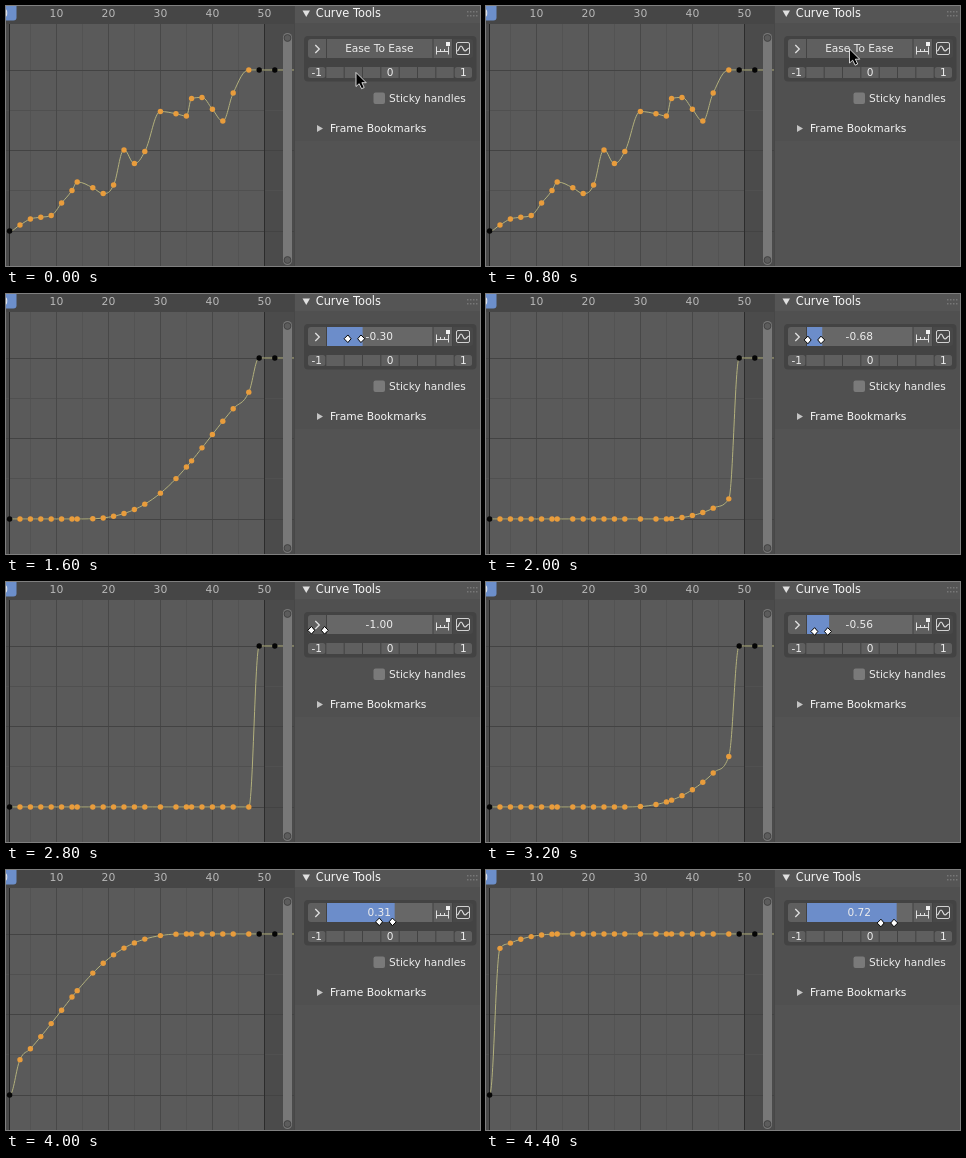
These frames come from a looping animation (474x260 px, 4500 ms). An HTML page:

```html
<!DOCTYPE html>
<html lang="en">
<head>
<meta charset="utf-8">
<title>Ease to ease slider</title>
<style>
html, body { margin: 0; width: 100%; height: 100%; overflow: hidden; background: #535353; }
svg { display: block; width: 474px; height: 260px; }
text { font-family: "DejaVu Sans", sans-serif; font-size: 10.6px; fill: #ececec; }
.mid { text-anchor: middle; }
.title { fill: #f6f6f6; font-size: 10.7px; }
.ruler text { fill: #b8b8b8; font-size: 10.8px; text-anchor: middle; }
.line { fill: none; stroke: #e0e0e0; }
</style>
</head>
<body>
<svg viewBox="0 0 474 260">
  <rect width="288" height="260" fill="#4b4b4b"/>
  <rect x="3" width="255.5" height="260" fill="#5a5a5a"/>
  <g id="grid" shape-rendering="crispEdges"></g>
  <path id="curve" fill="none" stroke="#b2b07c"/>
  <g id="dots"></g>

  <rect width="288" height="18" fill="#464646"/>
  <g id="ruler" class="ruler"></g>
  <rect x="-14" y="-4" width="24.5" height="18.5" rx="3" fill="#6c8fcb"/>
  <text class="mid" x="-1.5" y="11">0</text>

  <rect x="277" y="27" width="9" height="232" rx="4.5" fill="#787878"/>
  <circle cx="281.5" cy="32" r="3.4" fill="#5c5c5c" stroke="#434343"/>
  <circle cx="281.5" cy="254" r="3.4" fill="#5c5c5c" stroke="#434343"/>

  <rect x="288" width="186" height="260" fill="#535353"/>
  <rect x="288" width="186" height="135" fill="#505050"/>
  <rect x="288" width="186" height="17" fill="#555"/>
  <rect x="288" width="1" height="260" fill="#474747"/>
  <path d="M296.5 4.500h7.500l-3.750 6.500z" fill="#e0e0e0"/>
  <text class="title" x="309.700" y="11.300" style="font-size:11.400px">Curve Tools</text>
  <g id="grip" fill="#777"></g>

  <rect x="298" y="30" width="172.500" height="45.500" rx="4" fill="#434343"/>
  <path d="M305 33h15v19h-15a3 3 0 0 1 -3 -3v-13a3 3 0 0 1 3 -3z" fill="#5f5f5f"/>
  <path class="line" d="M309.300 39l4 4l-4 4" stroke-width="1.300"/>
  <rect id="field" x="321" y="33" width="105.500" height="19"/>
  <rect id="fill" x="321" y="33" height="19" fill="#6c8dca"/>
  <text id="label" class="mid" x="373.300" y="46"></text>

  <rect x="427.500" y="33" width="18.500" height="19" fill="#5f5f5f"/>
  <path class="line" d="M430.500 40.500v8M442.500 40.500v8M430.500 45.500h12M434.500 43v3M438.500 43v3"/>
  <rect x="440" y="36" width="4" height="4" fill="#f0f0f0"/>
  <path d="M447 33h17a3 3 0 0 1 3 3v13a3 3 0 0 1 -3 3h-17z" fill="#484848"/>
  <rect class="line" x="450.500" y="36.500" width="13" height="12" rx="1.500" stroke-width=".9"/>
  <path class="line" d="M451 45c2 0 2.200 -5 4 -5s2.200 5 4 5s2 -3 4.500 -3" stroke-width="1.200"/>

  <g id="blocks"></g>
  <rect x="367.500" y="86.500" width="11.500" height="11.500" rx="2" fill="#7a7a7a"/>
  <text x="383" y="96.300">Sticky handles</text>
  <path d="M311 119l6 3.500l-6 3.500z" fill="#c4c4c4"/>
  <text class="title" x="324" y="126.300">Frame Bookmarks</text>

  <path id="arrow" d="M0 0V14L3.200 11.200L5.600 16.200L8.200 15L5.900 10.200H10.200Z"
    fill="#000" stroke="#fff" stroke-width=".8"/>
  <g id="drag" fill="#fff" stroke="#000">
    <path d="M-10.300 0L-6.500 -3.800L-3.300 0L-6.500 3.800Z"/>
    <path d="M10.300 0L6.500 -3.800L3.300 0L6.500 3.800Z"/>
  </g>
</svg>
<script>
const LOOP = 4500, STEP = 100, PRESS = 1000, BACK = 2800;
const TOP = 64, BASE = 225, FIRST = 1, LAST = 49;
const HANDLE = 1 / 2.5614;
const NS = 'http://www.w3.org/2000/svg';
const $ = id => document.getElementById(id);
const px = frame => -1.6 + 5.2 * frame;

// Bends of the uneven curve: frame, y
const bends = [[1, BASE], [5, 213], [9, 209.5], [13, 184.5], [14, 176], [19, 187.5],
  [21, 179], [23, 144], [25, 157.5], [27, 145.5], [30, 105.5], [35, 110], [36, 92.5],
  [38, 91.5], [42, 115], [44, 87], [47, TOP], [LAST, TOP], [52, TOP]];

// Wide gaps get one more key halfway
const keys = bends.flatMap(([f, y], i) => {
  const [g, z] = bends[i + 1] || [f, y];
  return g - f < 4 ? [[f, y]] : [[f, y], [Math.round((f + g) / 2), (y + z) / 2]];
});
const times = keys.map(k => k[0]);
const rough = keys.map(k => k[1]);

function add(parent, name, attrs, text) {
  const node = document.createElementNS(NS, name);
  for (const key in attrs) node.setAttribute(key, attrs[key]);
  if (text) node.textContent = text;
  return parent.appendChild(node);
}

// Slider: speeds up down to -1, rests, then returns at a near steady pace
function sliderAt(t) {
  if (t < BACK) {
    const u = Math.max(0, (t - PRESS - 100) / 500);
    return Math.max(-1, -.2 * u - .1 * u * u);
  }
  const u = (t - BACK) / 800;
  return -1 + .9 * u - .02 * u * u;
}

function pointerAt(t, value) {
  if (t >= PRESS) return [364 + 52 * value, 43 + (t - PRESS) / 340];
  const rest = (1 - Math.min(1, t / 800)) ** 2;
  return [363.5 - 13.5 * rest, 43 + 23.5 * rest];
}

function sCurve(u) {
  if (u <= 0) return 0;
  if (u >= 1) return 1;
  return u * u / (u * u + (1 - u) * (1 - u));
}

function eased(value) {
  return times.map((f, i) => {
    if (f <= FIRST || f >= LAST) return rough[i];
    return BASE - (BASE - TOP) * sCurve((f - FIRST) / (LAST - FIRST) + value);
  });
}

// Auto-clamped slope at key i: flat at extremes, never past a neighbour
function slope(ys, i) {
  if (i === 0 || i === ys.length - 1) return 0;
  const before = (ys[i] - ys[i - 1]) / (px(times[i]) - px(times[i - 1]));
  const after = (ys[i + 1] - ys[i]) / (px(times[i + 1]) - px(times[i]));
  if (before * after <= 0) return 0;
  const limit = Math.min(Math.abs(before), Math.abs(after)) / HANDLE;
  return Math.sign(before) * Math.min(limit, Math.abs(before + after) / 2);
}

function curvePath(ys) {
  let d = `M${px(times[0])} ${ys[0]}`;
  for (let i = 1; i < ys.length; i++) {
    const a = px(times[i - 1]), b = px(times[i]), h = (b - a) * HANDLE;
    const y1 = ys[i - 1] + slope(ys, i - 1) * h, y2 = ys[i] - slope(ys, i) * h;
    d += `C${a + h} ${y1} ${b - h} ${y2} ${b} ${ys[i]}`;
  }
  return d + 'H288';
}

function build() {
  const hair = (x, y, width, height, fill) => add($('grid'), 'rect', { x, y, width, height, fill });
  const column = (f, fill) => hair(Math.round(px(f) - .4), 18, 1, 242, fill);
  for (let f = 5; f <= 45; f += 10) column(f, '#535353');
  for (const y of [104, 184]) hair(0, y, 277, 1, '#505050');
  for (let f = 10; f <= 40; f += 10) column(f, '#484848');
  for (const y of [64, 144, 225]) hair(0, y, 288, 1, '#434343');
  column(1, '#222');
  column(50, '#2c2c2c');

  for (let f = 10; f <= 50; f += 10) add($('ruler'), 'text', { x: px(f), y: 11 }, String(f));
  for (let i = 0; i < 8; i++) {
    add($('grip'), 'rect', { x: 461 + i % 4 * 3, y: 5 + (i >> 2) * 4, width: 1.5, height: 1.5 });
  }

  const w = 165 / 9;
  for (let i = 0; i < 9; i++) {
    const x = 302 + i * w;
    add($('blocks'), 'rect', { x, y: 61, width: w - 1, height: 11, rx: i % 8 ? 0 : 2.5, fill: '#5f5f5f' });
    if (i % 4 === 0) {
      add($('blocks'), 'text', { x: x + w / 2 - .5, y: 70.3, class: 'mid' }, String(i / 4 - 1));
    }
  }
  return times.map(f => add($('dots'), 'circle', {
    cx: px(f), r: 2.7, fill: f <= FIRST || f >= LAST ? '#050505' : '#e89c3c'
  }));
}

const dots = build();

function draw(ms) {
  const t = Math.floor(ms % LOOP / STEP) * STEP;
  const active = t >= PRESS;
  const value = sliderAt(t);
  const ys = active ? eased(value) : rough;

  $('curve').setAttribute('d', curvePath(ys));
  dots.forEach((dot, i) => dot.setAttribute('cy', ys[i]));

  $('field').setAttribute('fill', active ? '#676767' : '#5f5f5f');
  $('fill').setAttribute('width', active ? Math.max(0, 53 * (value + 1) - 1.5) : 0);
  $('label').textContent = active ? (value || 0).toFixed(2) : 'Ease To Ease';

  const at = `translate(${pointerAt(t, value).join(' ')})`;
  for (const [id, shown] of [['arrow', !active], ['drag', active]]) {
    $(id).setAttribute('transform', at);
    $(id).setAttribute('display', shown ? 'inline' : 'none');
  }
}

const start = performance.now();
function tick() {
  draw(performance.now() - start);
  requestAnimationFrame(tick);
}
tick();
</script>
</body>
</html>
```
